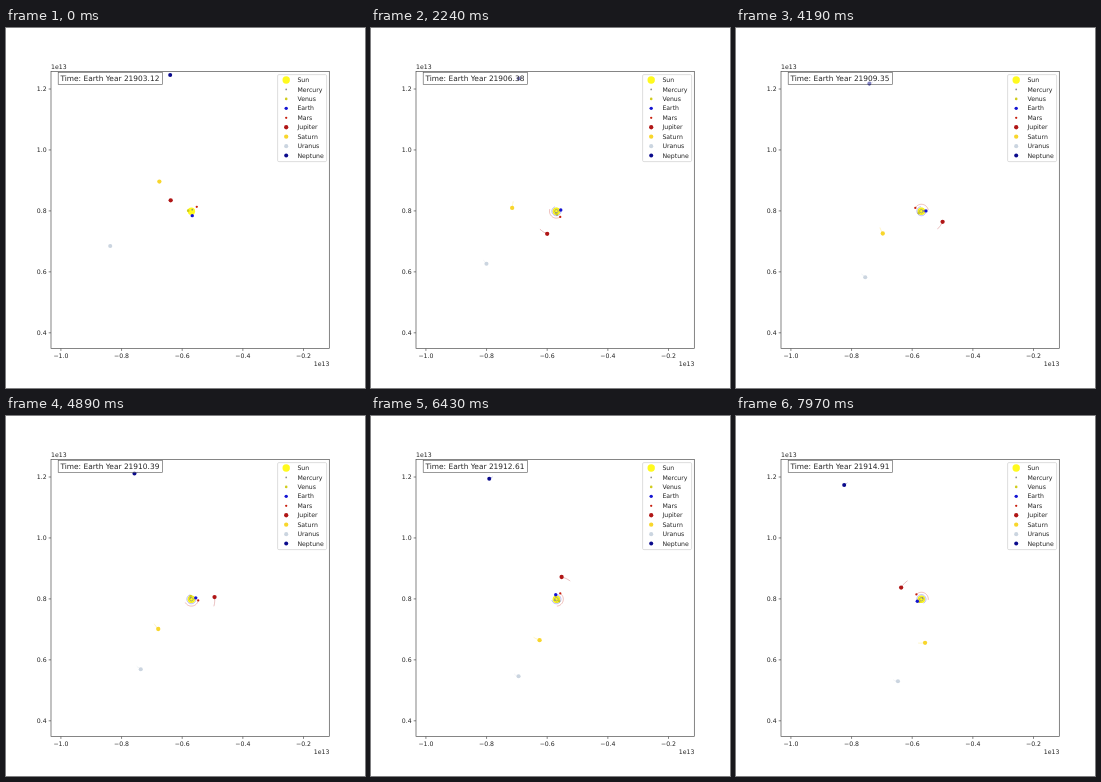
An HTML page for the animation above (8000 ms loop, 359 px wide and 360 px high).

```html
<!DOCTYPE html>
<html lang="en">
<head>
<meta charset="utf-8">
<title>Planet orbits</title>
<style>
  html, body { margin: 0; width: 100%; height: 100%; overflow: hidden; background: #fff; }
  svg { display: block; width: 100%; height: 100%; }
  text { font: 6.2px "DejaVu Sans", sans-serif; fill: #262626; }
  #clock { font-size: 7.45px; }
  .axis { fill: none; stroke: #444; stroke-width: .65; }
  .trail { fill: none; stroke-width: .55; stroke-opacity: .5; }
</style>
</head>
<body>
<svg id="stage" viewBox="0 0 359 360">
  <g id="bodies"></g>
  <g id="axes"></g>
  <rect x="52.2" y="44.3" width="104.2" height="12" fill="#fff" fill-opacity=".5" stroke="#555" stroke-width=".6"/>
  <text id="clock" x="54.4" y="52.5"></text>
  <g id="legend">
    <rect x="271.6" y="46.6" width="49" height="87" rx="1.3" fill="#fff" fill-opacity=".8" stroke="#ccc" stroke-width=".65"/>
  </g>
</svg>
<script>
const $ = id => document.getElementById(id);
const RAD = Math.PI / 180;
const LOOP = 8000;
const START_YEAR = 21903.1214, YEARS_PER_STEP = 0.07416;
const TRAIL_STEPS = 10;
const SUN = { x: 185.4, y: 183.2 };
const AU = 4.54;

// period in years; phase (mean longitude at the start) and peri (perihelion) in degrees
const bodies = [
  { name: 'Sun', color: '#fffa1e', r: 3.7 },
  { name: 'Mercury', color: '#8c8c8c', r: .85, period: .2408, phase: 60 },
  { name: 'Venus', color: '#d0cc1e', r: 1.3, period: .6152, phase: 170 },
  { name: 'Earth', color: '#1414d2', r: 1.7, period: 1, phase: -79 },
  { name: 'Mars', color: '#c8200f', r: 1.15, period: 1.8808, phase: 39 },
  { name: 'Jupiter', color: '#b01616', r: 2.15, period: 11.862, phase: 148.4, ecc: .035, peri: 73 },
  { name: 'Saturn', color: '#f8d62c', r: 2.15, period: 29.46, phase: 133.9, ecc: .03, peri: 30 },
  { name: 'Uranus', color: '#cbd5e0', r: 2.05, period: 84.02, phase: 207.5, ecc: .04, peri: 318 },
  { name: 'Neptune', color: '#0a0a8c', r: 2, period: 164.8, phase: 98.6, ecc: .011, peri: -70 }
];

function add(parent, tag, attrs, text) {
  const el = document.createElementNS('http://www.w3.org/2000/svg', tag);
  for (const key in attrs) el.setAttribute(key, attrs[key]);
  if (text) el.textContent = text;
  return parent.appendChild(el);
}

// Kepler orbit to first order in eccentricity; its size follows from the period.
function position({ period, phase, ecc = 0, peri = 0 }, step) {
  if (!period) return [SUN.x, SUN.y];
  const mean = (phase + 360 * step * YEARS_PER_STEP / period) * RAD;
  const anomaly = mean - peri * RAD;
  const angle = mean + 2 * ecc * Math.sin(anomaly);
  const radius = AU * period ** (2 / 3) * (1 - ecc * Math.cos(anomaly));
  return [SUN.x + radius * Math.cos(angle), SUN.y - radius * Math.sin(angle)];
}

bodies.forEach((b, i) => {
  const y = 52 + i * 9.45;
  b.trail = add($('bodies'), 'polyline', { class: 'trail', stroke: b.color });
  b.dot = add($('bodies'), 'circle', { r: b.r, fill: b.color });
  add($('legend'), 'circle', { cx: 280.2, cy: y, r: b.r, fill: b.color });
  add($('legend'), 'text', { x: 291.4, y: y + 2.1 }, b.name);
});

const axes = $('axes');
add(axes, 'rect', { class: 'axis', x: 45, y: 43.4, width: 278.3, height: 277.2 });
for (let i = 0; i < 5; i++) {
  const x = 54.9 + i * 60.65, y = 61 + i * 60.95;
  add(axes, 'path', { class: 'axis', d: `M${x} 320.6v2.3M45 ${y}h-2.3` });
  add(axes, 'text', { x, y: 330, 'text-anchor': 'middle' }, '\u2212' + (1 - i * .2).toFixed(1));
  add(axes, 'text', { x: 40.7, y: y + 2.4, 'text-anchor': 'end' }, (1.2 - i * .2).toFixed(1));
}
add(axes, 'text', { x: 45, y: 41.4 }, '1e13');
add(axes, 'text', { x: 323.4, y: 338.4, 'text-anchor': 'end' }, '1e13');

function draw(ms) {
  // Pictures last 70 ms, apart from one that is 10 ms shorter.
  const tick = Math.floor((ms + (ms >= 2370 ? 10 : 0)) / 70);
  const step = Math.floor(tick * 7 / 5);
  $('clock').textContent = 'Time: Earth Year ' + (START_YEAR + step * YEARS_PER_STEP).toFixed(2);
  for (const b of bodies) {
    const [x, y] = position(b, step);
    b.dot.setAttribute('cx', x);
    b.dot.setAttribute('cy', y);
    const path = [];
    for (let s = Math.max(0, step - TRAIL_STEPS); s <= step; s += .25) {
      path.push(position(b, s).map(v => v.toFixed(2)).join());
    }
    b.trail.setAttribute('points', path.join(' '));
  }
}

let origin;
function frame(now) {
  origin ??= now;
  draw((now - origin) % LOOP);
  requestAnimationFrame(frame);
}
draw(0);
requestAnimationFrame(frame);
</script>
</body>
</html>
```
